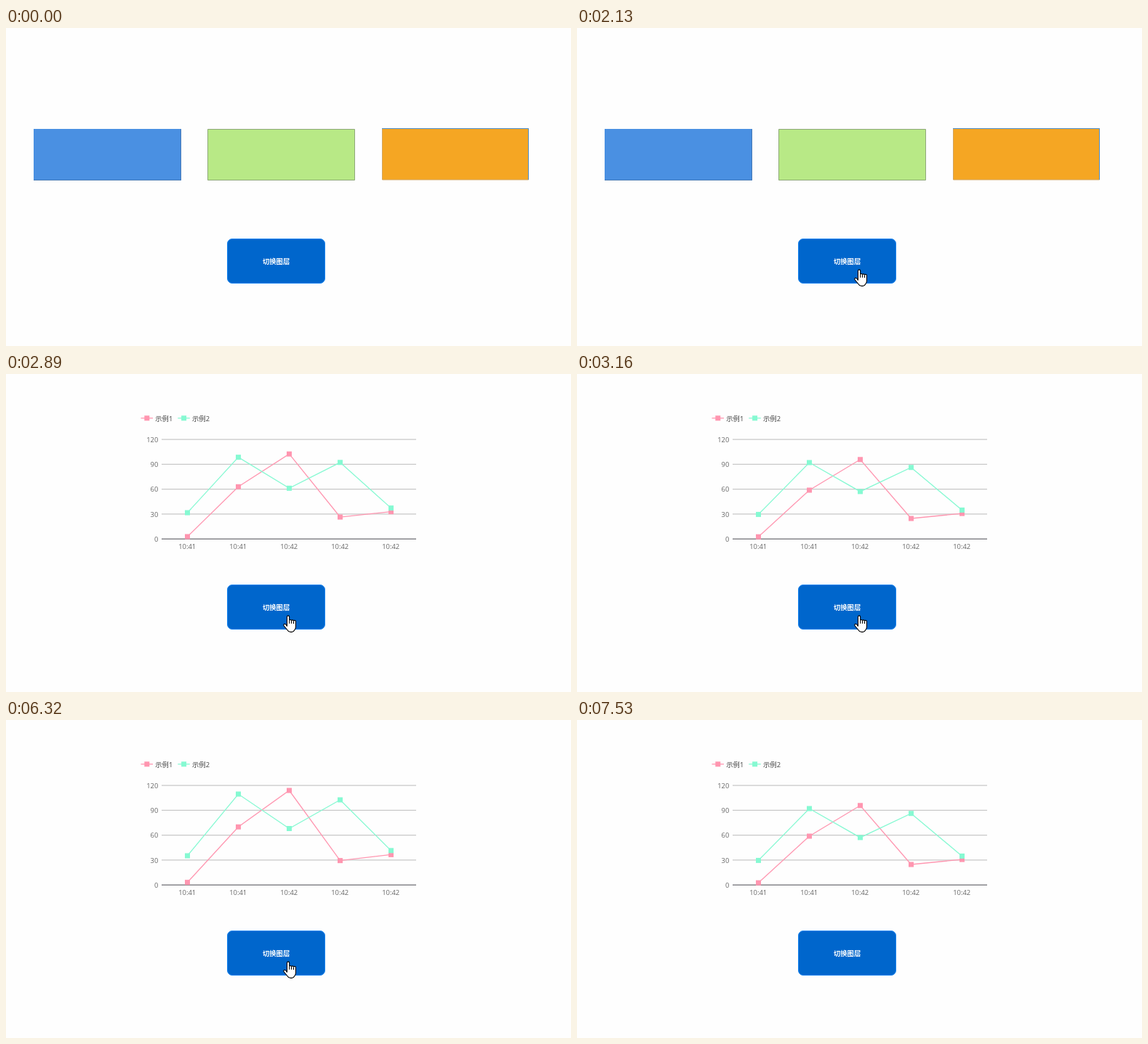
These frames come from a looping animation (777 px wide and 438 px high, 7.81 s). An HTML page:

```html
<!DOCTYPE html>
<html lang="zh">
<head>
<meta charset="utf-8">
<style>
  html, body { margin: 0; width: 100%; height: 100%; overflow: hidden; background: #fefefe; }
  svg { display: block; }
  text { font: 9.35px "Open Sans", "Noto Sans CJK SC", "Noto Sans CJK", sans-serif; fill: #666; }
  .legend { fill: #444; }
  .button { font-weight: bold; fill: #fff; text-anchor: middle; }
</style>
</head>
<body>
<svg width="777" height="438" viewBox="0 0 777 438">
  <g id="blocks">
    <path fill="#4a90e2" d="M38 139h203v71h-203z"/>
    <path fill="none" stroke="#4679b4" d="M38 209.5h202.5v-70"/>
    <path fill="#b8e986" stroke="#8fa97a" d="M277.5 139.5h202v70h-202z"/>
    <path fill="#f5a623" stroke="#d3a55c" d="M517.5 138.5h201v70.5h-201z"/>
    <path fill="none" stroke="#4a8fd0" d="M517 138.5h201.5v70.5"/>
  </g>
  <g id="chart"></g>
  <rect x="304.5" y="290.5" width="134" height="61" rx="6.5" fill="#06c" stroke="#1684f0"/>
  <text class="button" x="371.6" y="325.3">切换图层</text>
  <g id="arrow" fill="#fff" stroke="#000">
    <path d="M.5 .8V16.6L4.2 13.2 6.6 18.5 8.9 17.5 6.6 12.3H11.4Z"/>
  </g>
  <g id="hand" transform="translate(381 332)" fill="#fff" stroke="#000" stroke-width="1.1">
    <path d="M5.5 15.5V2.5a1.6 1.6 0 0 1 3.2 0V7.5a1.5 1.5 0 0 1 2.9 .3a1.5 1.5 0 0 1 2.9 .6a1.5 1.5 0 0 1 2.9 1.2V16.5Q17.4 19 15.5 21Q14.5 23.4 12 23.4H10.5Q7.5 23.4 6.2 21L1 14.5Q.3 12.5 2.3 12.3Q3.8 12.3 5.5 15.5Z"/>
    <path fill="none" d="M8.7 7.5v4.3M11.6 8v3.8M14.5 8.6v3.4"/>
  </g>
</svg>
<script>
const LOOP = 7810, BASE = 227.2, LEFT = 214, RIGHT = 564;
const $ = id => document.getElementById(id);
const xs = [249.5, 319.5, 389.5, 459.5, 529.5];
const series = [
  { name: '示例1', color: '#ff96b0', heights: [3, 67.2, 109.4, 28.2, 35.1], legendX: 185.5 },
  { name: '示例2', color: '#86f9d2', heights: [33.8, 105.2, 65.3, 98.5, 39.8], legendX: 236.3 }
];

// [start, value] pairs; each value holds until the next start
const arrowSteps = [[0, null], [1680, [445, 415]], [1830, [414, 383]], [1980, [403, 359]], [2130, null],
  [7140, [470, 330]], [7260, [615, 383]], [7410, [721, 423]], [7530, null]];
const handSteps = [[0, false], [2130, true], [7140, false]];
// Overshoot of the plotted values settling to 1; null shows the blocks
const scaleSteps = [[0, null], [2590, 1.2], [2740, 1.18], [2890, 1.07], [3010, 1.003], [3160, 1],
  [4530, null], [6320, 1.19], [6440, 1.106], [6590, 1.007], [6710, 1]];

const valueAt = (steps, t) => steps.findLast(([start]) => start <= t)[1];
const show = (el, on) => el.style.display = on ? '' : 'none';
const line = (x1, x2, y, color, width = 1.2) =>
  `<path d="M${x1} ${y}H${x2}" stroke="${color}" stroke-width="${width}"/>`;
const text = (x, y, s, anchor, cls = '') =>
  `<text x="${x}" y="${y}" text-anchor="${anchor}" class="${cls}">${s}</text>`;
const marker = (x, y, color) =>
  `<rect x="${x - 3.5}" y="${y - 3.5}" width="7" height="7" fill="${color}"/>`;

function axes() {
  let out = '';
  for (let v = 0; v <= 120; v += 30) {
    const y = BASE - v * 1.1425;
    out += line(LEFT, RIGHT, y, v ? '#c8c8c8' : '#85858a', v ? 1.3 : 1.4);
    out += text(209.3, y + 3.7, v, 'end');
  }
  xs.forEach((x, i) => out += text(x - .3, 241.2, i < 2 ? '10:41' : '10:42', 'middle'));
  for (const { name, color, legendX } of series) {
    out += line(legendX, legendX + 16.5, 60.8, color, 1.3) + marker(legendX + 8.3, 60.8, color);
    out += text(legendX + 19.7, 64.8, name, 'start', 'legend');
  }
  return out;
}

function plot(scale) {
  return series.map(({ color, heights }) => {
    const pts = heights.map((h, i) => [xs[i], BASE - h * scale]);
    return `<polyline points="${pts.join(' ')}" fill="none" stroke="${color}" stroke-width="1.3"/>` +
      pts.map(([x, y]) => marker(x, y, color)).join('');
  }).join('');
}

$('chart').innerHTML = axes() + '<g id="plot"></g>';
let lastScale;

function draw(now) {
  const t = now % LOOP;
  const scale = valueAt(scaleSteps, t), tip = valueAt(arrowSteps, t);
  show($('blocks'), scale === null);
  show($('chart'), scale !== null);
  if (scale !== null && scale !== lastScale) $('plot').innerHTML = plot(lastScale = scale);
  show($('hand'), valueAt(handSteps, t));
  show($('arrow'), tip);
  if (tip) $('arrow').setAttribute('transform', `translate(${tip})`);
}

const begin = performance.now();
function frame() {
  draw(performance.now() - begin);
  requestAnimationFrame(frame);
}
frame();
</script>
</body>
</html>
```
